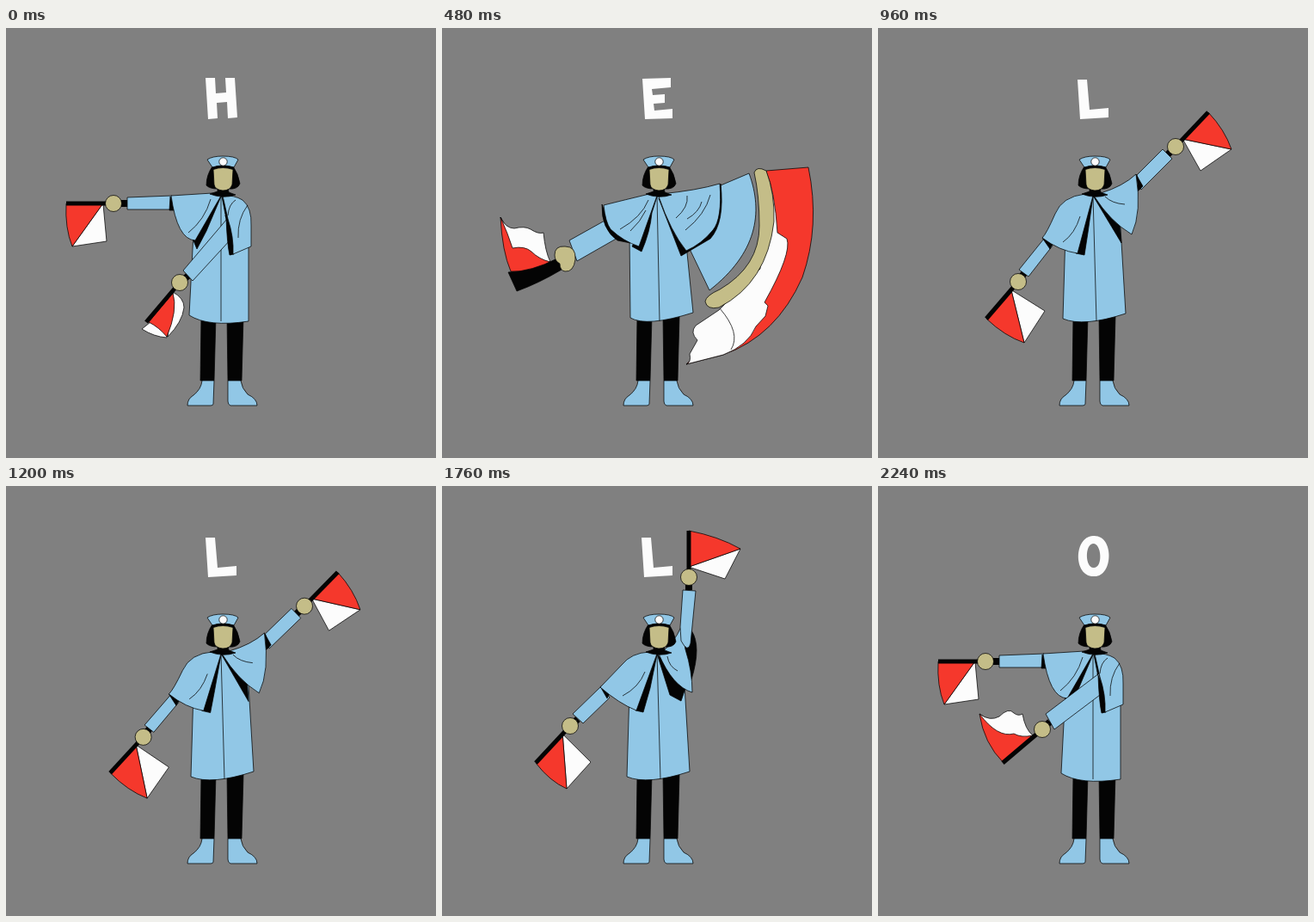
An HTML page with a canvas that plays this animation: 500 by 500 pixels, repeating every 2320 ms.

```html
<!DOCTYPE html>
<html lang="en">
<head>
<meta charset="utf-8">
<title>Semaphore</title>
<style>
  html, body { margin: 0; width: 100%; height: 100%; overflow: hidden; background: #808080; }
  canvas { display: block; width: 500px; height: 500px; }
</style>
</head>
<body>
<canvas id="stage" role="img" aria-label="A signaller spells HELLO with two flags"></canvas>
<script>
const LOOP = 2320;
const BLUE = '#91c7e6', SKIN = '#c4bd88', RED = '#f5382c', WHITE = '#fcfcfc', BLACK = '#040404';
const THIN = 0.75;
const canvas = document.getElementById('stage');
const ctx = canvas.getContext('2d');
const scale = Math.max(1, window.devicePixelRatio || 1);
canvas.width = canvas.height = 500 * scale;

function shape(fill, ...paths) {
  ctx.fillStyle = fill;
  for (const d of paths) {
    const path = new Path2D(d);
    ctx.fill(path);
    ctx.stroke(path);
  }
}

function line(d, width = THIN) {
  ctx.lineWidth = width;
  ctx.stroke(new Path2D(d));
  ctx.lineWidth = THIN;
}

function disc(x, y, r, fill) {
  ctx.beginPath();
  ctx.arc(x, y, r, 0, 7);
  ctx.fillStyle = fill;
  ctx.fill();
  ctx.stroke();
}

function turned(degrees, x, y, draw) {
  ctx.save();
  ctx.translate(x, y);
  ctx.rotate(degrees * Math.PI / 180);
  ctx.translate(-x, -y);
  draw();
  ctx.restore();
}

// Taut flag: hand, pole tip, outer cloth corner, inner cloth corner.
function flag(hx, hy, tx, ty, ax, ay, bx, by) {
  const ix = hx + (tx - hx) * 0.22, iy = hy + (ty - hy) * 0.22;
  const mx = (tx + ax) / 2, my = (ty + ay) / 2;
  const bulge = `${mx + (mx - ix) * 0.13} ${my + (my - iy) * 0.13}`;
  shape(WHITE, `M${ix} ${iy}L${ax} ${ay}L${bx} ${by}Z`);
  shape(RED, `M${ix} ${iy}L${tx} ${ty}Q${bulge} ${ax} ${ay}Z`);
  line(`M${hx} ${hy}L${tx} ${ty}`, 5);
}

function limb(sleeve, hx, hy, cx, cy, drawFlag) {
  drawFlag();
  line(`M${hx} ${hy}L${cx} ${cy}`, 8);
  shape(BLUE, sleeve);
  disc(hx, hy, 9.5, SKIN);
}

const letters = {
  H: 'M232 58L243 58L244 76L256 75L255 58L266 58L269 104L258 105L257 86L245 87L246 105L235 106Z',
  E: 'M233 59L266 58L266 69L244 71L245 78L259 77L259 87L246 88L247 96L268 94L268 105L236 106Z',
  L: 'M232 60L243 60L246 95L268 93L268 104L235 106Z',
  O: 'M250 58C275 56 274 105 252 105C227 107 227 59 250 58ZM250 67C240 68 241 96 251 95C262 95 260 66 250 67Z',
};

// Hem of the coat: left corner, middle, right corner.
const coats = {
  side: [213, 334, 250, 282, 341],
  down: [219, 340, 258, 290, 327],
  wide: [219, 337, 253, 292, 331],
  open: [215, 338, 254, 288, 332],
};

function drawCoat([lx, ly, mx, rx, ry]) {
  shape(BLUE, `M240 194L218 238L${lx} ${ly}Q${mx - 15} 348 ${rx} ${ry}L282 232L262 194Z`);
  line(`M250 195L${mx} 341`);
}

function drawLegs() {
  shape(BLACK, 'M227 335L244 335L242 410L226 410Z', 'M257 335L276 335L274 410L258 410Z');
  shape(BLUE,
    'M228 410L242 410L241 437Q241 439 238 439L211 439Q211 431 218 427Q227 420 228 410Z',
    'M258 410L273 410Q274 419 281 426Q292 431 292 439L261 439Q258 438 258 434Z');
}

function drawHead() {
  shape(BLACK,
    'M240 161Q233 171 233 183Q237 187 246 187L259 187Q269 188 272 181Q270 169 264 161Z',
    'M246 185L258 185L259 191L267 194Q252 199 237 193L246 190Z');
  shape(SKIN, 'M241 164.5Q252 160.5 264 164.5L263 182Q261 189 252 189Q243 188 242 182Z');
  shape(BLUE, 'M234 153Q240 149 252 149Q266 149 270 153L265 162Q252 158 240 162Z');
  line('M240 163Q252 158 265 163', 2);
  disc(252.5, 155.5, 4.7, WHITE);
}

// Arms on the left of the picture.
const left = {
  side() {
    limb('M141 197L193 195L193 211L141 211Z', 125, 204, 141, 204,
      () => flag(125, 204, 70, 204, 77, 254, 117, 248));
    shape(BLACK, 'M191 196L197 212L190 212Z', 'M250 196L217 245L222 257L233 236Z');
    shape(BLUE, 'M240 192L192 195Q199 246 220 247L250 195Z');
    line('M238 199Q231 223 212 238');
  },
  low() {
    limb('M193 245L164 281L175 289L203 253Z', 163, 295, 170, 285,
      () => flag(163, 295, 126, 338, 170, 366, 194, 329));
    shape(BLACK, 'M191 244L204 249L200 257Z', 'M250 196L230 262L240 264L244 238Z');
    shape(BLUE, 'M241 193Q214 196 206 216Q196 239 191 244Q211 259 232 262L250 195Z');
    line('M235 219Q229 239 215 249');
  },
  flutter() {
    limb('M195 243L170 282L181 288L205 252Z', 166, 296, 175, 285, () => {
      shape(WHITE, 'M162 307Q179 309 186 319Q187 342 177 356L171 346Z');
      shape(RED, 'M162 307Q175 322 177 345L177 355L171 363L160 361Q169 359 172 353Q155 348 138 346Z');
      line('M166 296L138 346', 5);
    });
    shape(BLACK, 'M194 240L205 249L201 256Z', 'M250 196L231 264L238 267L243 240Z');
    shape(BLUE, 'M241 193Q214 196 205 219L194 240Q211 259 233 265L250 195Z');
    line('M236 220Q230 238 217 248');
  },
  down() {
    limb('M204 250L203 307Q211 312 218 308L220 258Z', 209, 325, 211, 309,
      () => flag(209, 325, 207, 380, 253, 385, 252, 342));
    shape(BLACK, 'M204 252L222 263L221 255Z', 'M221 257L244 263L246 225L240 257Z');
    shape(BLUE, 'M241 193Q214 198 208 225L204 252Q221 261 240 259L250 195Z');
    line('M238 215Q234 235 223 251');
  },
  out() {
    limb('M185 233L152 265L164 276L195 246Z', 149, 279, 158, 271,
      () => flag(149, 279, 109, 322, 145, 352, 173, 321));
    shape(BLACK, 'M184 233L196 239L192 247Z', 'M250 196L225 261L234 263L242 235Z');
    shape(BLUE, 'M241 193Q220 194 209 208L184 234Q206 253 226 261L250 195Z');
    line('M236 216Q229 234 210 244');
  },
  swoop() {
    shape(RED, 'M68 220Q70 260 80 283Q105 285 126 272L98 250L80 240Z');
    shape(WHITE, 'M68 220Q74 233 84 233Q96 230 103 234Q112 240 118 238Q120 260 126 272Q113 269 104 260Q96 253 82 256Q77 240 68 220Z');
    shape(BLACK, 'M77 284L87 306Q112 297 139 281L134 268Q105 283 77 284Z');
    shape(BLUE, 'M191 223L148 247L157 271L206 243Z');
    shape(SKIN, 'M131 264Q131 253 143 254Q156 254 155 269Q153 284 143 283Q137 282 137 274Q131 271 131 264Z');
    shape(BLACK, 'M186 205Q185 234 204 247L219 250L194 228Z', 'M250 196L221 254L232 260Q242 237 244 215Z');
    shape(BLUE, 'M241 193Q212 200 188 206Q190 226 196 234Q211 248 229 254L250 195Z');
    line('M240 200Q232 220 207 234M219 236Q231 225 237 212');
  },
};

// The arm that reaches across the chest turns under a still shoulder cape.
function across(angle, drawArm) {
  shape(BLACK, 'M251 196L256 222L261 264L265 260L260 216Z');
  turned(angle, 262, 232, drawArm);
  shape(BLACK, 'M256 220Q257 250 260 264L265 263Q264 235 255 218Z');
  shape(BLUE, 'M252 195Q265 194 275 200Q286 209 285 230L285 254L264 263Q265 243 258 222Z');
  line('M267 200Q259 205 258 218M281 206Q269 222 270 244');
}

function crossLow(angle, drawFlag) {
  across(angle, () => limb('M257 222L206 282L217 294L262 245Z', 202, 296, 212, 288, drawFlag));
}

// Arms on the right of the picture.
const right = {
  crossFlutter: angle => crossLow(angle, () => {
    shape(WHITE, 'M194 307Q207 314 207 325Q205 342 188 359Z', 'M168 342L158 350Q172 359 187 360L189 350Z');
    shape(RED, 'M194 308Q200 328 187 359Q178 348 166 342Z');
    line('M202 296L163 342', 5);
  }),
  crossLow: angle => crossLow(angle, () => flag(202, 296, 164, 341, 196, 366, 226, 332)),
  crossMid: angle => across(angle, () =>
    limb('M257 218L195 265L205 283L262 240Z', 191, 283, 200, 274, () => {
      shape(RED, 'M118 265Q123 299 146 322L180 290L150 286Z');
      shape(WHITE, 'M118 265Q130 274 141 268Q152 257 158 264Q163 268 168 265Q171 283 180 290Q167 293 158 288Q139 293 118 265Z');
      line('M191 283L145 322', 5);
    })),
  crossHigh: angle => across(angle, () =>
    limb('M269 220L208 177L196 191L258 244Z', 186, 172, 202, 184,
      () => flag(186, 172, 148, 128, 110, 160, 140, 196))),
  high() {
    limb('M301 171L331 141L342 152L306 188Z', 346, 138, 337, 147,
      () => flag(346, 138, 384, 98, 411, 141, 375, 166));
    shape(BLACK, 'M300 170L308 184L302 190Z', 'M250 195L283 250L281 228L262 205Z');
    shape(BLUE, 'M259 192Q285 184 300 170Q307 214 295 240Q270 225 251 195Z');
    line('M264 196Q272 204 287 205');
  },
  flutter() {
    limb('M296 176L325 141L338 151L301 188Z', 340, 133, 333, 145, () => {
      shape(WHITE, 'M354 92L358 116L345 124L332 122Q345 109 354 92Z',
        'M346 126L386 117Q380 135 363 140Q359 130 346 126Z');
      shape(RED, 'M354 93Q364 97 376 88Q389 100 388 117Q371 125 348 126Q358 112 354 93Z');
      line('M340 133L374 88', 5);
    });
    shape(BLACK, 'M295 174L300 185Q301 223 294 242L289 238Z', 'M251 195L282 250L282 232L263 210Z');
    shape(BLUE, 'M259 192Q284 184 295 175Q298 213 291 241Q266 224 252 195Z');
    line('M262 198Q271 210 286 211');
  },
  up() {
    shape(BLACK, 'M290 168Q302 186 290 225L282 190Z', 'M250 195L265 243L278 250L283 235Z');
    shape(BLUE, 'M255 193Q269 184 278 164L283 190Q291 215 291 240Q268 233 252 195Z');
    limb('M280 121L295 122L289 183Q286 195 278 180L277 164Z', 287, 106, 287, 121,
      () => flag(287, 106, 287, 52, 347, 73, 329, 108));
    line('M262 198Q264 210 274 215');
  },
  swoop() {
    shape(RED, 'M377 166L426 162Q440 230 419 290Q389 358 327 380L284 391L378 300Z');
    shape(WHITE, 'M377 167Q387 190 390 238L401 245Q407 262 375 319L379 323L376 335L365 347Q356 369 327 380L284 391Q290 389 288 379L297 363Q288 354 295 346L322 328L370 280Z');
    line('M323 326Q348 355 336 374');
    shape(BLUE, 'M324 183L357 169C374 215 366 262 311 305L288 257Q325 234 324 183Z');
    shape(SKIN, 'M363 168Q366 160 377 166Q387 192 386 225Q378 296 322 325Q308 328 306 318Q307 311 323 304Q369 277 369 230Q369 195 363 168Z');
    shape(BLACK, 'M324 181Q329 226 312 245L278 265L252 198L283 257Z');
    shape(BLUE, 'M254 193Q296 189 323 181Q326 222 315 235Q302 251 284 259Q266 237 252 196Z');
    line('M285 195Q287 208 272 221M312 194Q306 217 283 235M285 222Q299 214 302 202');
  },
};

// start, letter, coat, left arm, its turn, right arm, its turn
const poses = [
  [0, 'H', 'side', 'side', 0, 'crossFlutter', 0],
  [80, 'H', 'side', 'side', 0, 'crossLow', 0],
  [240, 'H', 'side', 'side', 0.3, 'crossLow', 0.4],
  [400, 'H', 'side', 'side', -2, 'crossLow', -5],
  [480, 'E', 'wide', 'swoop', 0, 'swoop', 0],
  [520, 'E', 'down', 'flutter', 0, 'flutter', -2],
  [560, 'E', 'down', 'down', 5, 'flutter', 0],
  [640, 'E', 'down', 'down', -2, 'high', -1.5],
  [720, 'E', 'down', 'down', 0, 'high', -0.6],
  [880, 'E', 'open', 'low', -12, 'high', -0.4],
  [960, 'L', 'open', 'low', 0, 'high', 0],
  [1200, 'L', 'open', 'low', 2, 'high', 1],
  [1240, 'L', 'open', 'low', 4, 'high', 2],
  [1280, 'L', 'open', 'low', 3, 'high', 1],
  [1320, '', 'open', 'flutter', 2, 'flutter', 2],
  [1360, '', 'open', 'flutter', 0, 'flutter', 0],
  [1440, 'L', 'open', 'low', -1, 'high', -1],
  [1520, 'L', 'open', 'low', 0, 'high', 0],
  [1760, 'L', 'open', 'out', 0, 'up', 0],
  [1840, 'O', 'open', 'out', 14, 'up', -20],
  [1920, 'O', 'side', 'side', 1, 'crossHigh', -4],
  [2000, 'O', 'side', 'side', 0, 'crossHigh', 0],
  [2160, 'O', 'side', 'side', 0, 'crossMid', 25],
  [2240, 'O', 'side', 'side', 0, 'crossMid', 0],
];

function draw(time) {
  const [, letter, coat, leftArm, leftTurn, rightArm, rightTurn] = poses.findLast(p => p[0] <= time);
  ctx.setTransform(scale, 0, 0, scale, 0, 0);
  ctx.fillStyle = '#808080';
  ctx.fillRect(0, 0, 500, 500);
  ctx.lineWidth = THIN;
  ctx.strokeStyle = BLACK;
  ctx.lineJoin = 'round';

  drawLegs();
  drawCoat(coats[coat]);
  turned(leftTurn, 250, 197, left[leftArm]);
  if (rightArm.startsWith('cross')) right[rightArm](rightTurn);
  else turned(rightTurn, 250, 197, right[rightArm]);
  drawHead();
  if (letter) {
    ctx.fillStyle = WHITE;
    ctx.fill(new Path2D(letters[letter]), 'evenodd');
  }
}

const start = performance.now();
function tick() {
  draw((performance.now() - start) % LOOP);
  requestAnimationFrame(tick);
}
tick();
</script>
</body>
</html>
```
